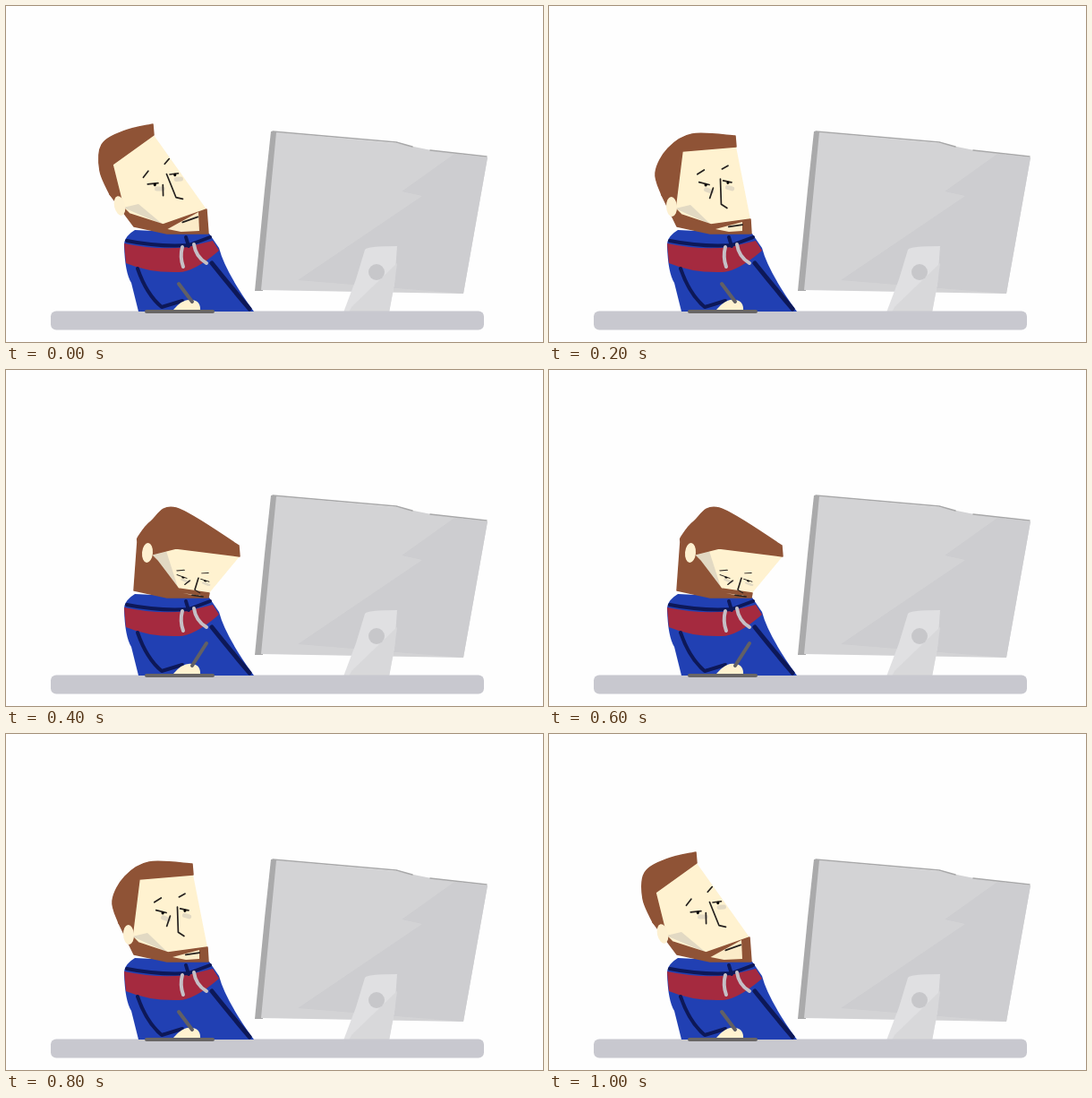
Animation, 600 px wide and 375 px high, one loop 1.1 s. Source, as an HTML page:

```html
<!DOCTYPE html>
<html lang="en">
<head>
<meta charset="utf-8">
<title>Tired at the desk</title>
<style>
  html, body { margin: 0; width: 100%; height: 100%; overflow: hidden; background: #fefefe; }
  svg { display: block; width: 100%; height: 100%; }
  .line { fill: none; stroke-linecap: round; stroke-linejoin: round; }
  .ink { stroke: #25211f; stroke-width: 1.7; }
  .shade { stroke: #e2d9c3; stroke-width: 5; }
  .hair { fill: #8f5336; stroke: #8f5336; stroke-width: 1.5; stroke-linejoin: round; }
</style>
</head>
<body>
<svg viewBox="0 0 600 375">
  <g id="monitor">
    <path fill="#aaaaab" d="M296 140H303L287 318H278L289 205Z"/>
    <path fill="#d3d3d5" d="M302 141L436 153 480 162 538 169 511 321 285 317Z"/>
    <path fill="#cdcdd0" d="M501 165L538 169 511 321 326 306 465 212 442 207Z"/>
    <path class="line" stroke="#a8a8a9" stroke-width="1.5" d="M298 140L436 152 454 157M474 161L537 168"/>
    <path fill="#e0e0e2" d="M401 272Q403 268 437 268L434 310 428 342H377L391 305Z"/>
    <path fill="#d8d8da" d="M437 287L386 336 383 342H428L434 310Z"/>
    <circle cx="414" cy="297" r="9" fill="#c7c7ca"/>
  </g>
  <rect x="50" y="340.5" width="484" height="21" rx="6" fill="#c8c8cf"/>
  <g id="body">
    <path fill="#2140b3" d="M144 250Q131 258 132 268 133 298 140 309L148 341H277Q245 297 238 270L227 254Z"/>
    <path fill="#a52a3f" d="M132 265Q170 273 202 269L231 262 238 273Q210 297 193 297 160 298 134 287Z"/>
    <g class="line" stroke="#0d1858">
      <path stroke-width="4" d="M135 262Q170 269 204 267L228 258M201 258L204 268M147 293Q157 322 174 336L197 329"/>
      <path stroke-width="5" d="M230 287Q250 312 272 338"/>
    </g>
    <path class="line" stroke="#c5c0c6" stroke-width="4" d="M197 269Q194 280 198 291M210 266Q212 280 224 287"/>
  </g>
  <path id="face" fill="#fff2d0"/>
  <path id="cheek" fill="#e2d9c3"/>
  <path id="hair" class="hair"/>
  <path id="beard" class="hair"/>
  <ellipse id="ear" rx="6" ry="11" fill="#fdf0d0"/>
  <path id="mouth" fill="#fbebc8"/>
  <path id="lips" class="line ink"/>
  <g id="features">
    <path class="line shade" d="M1 6L7 9M25 6L30 8"/>
    <path class="line ink" d="M-7 -12L1 -16M21 -15L28 -18M-6 -3L5 1M21 -2L30 1M18 -4L16 24 22 29M9 5L4 16"/>
    <circle cx="1" cy="1" r="1.6"/><circle cx="26" cy="1" r="1.6"/>
  </g>
  <path fill="#fff2d0" d="M187 339Q198 326 208 328 218 329 217 341Z"/>
  <path class="line" stroke="#696665" stroke-width="4" d="M157 341H231"/>
  <path id="pen" class="line" stroke="#626064" stroke-width="4"/>
</svg>
<script>
const parts = Object.fromEntries(
  [...document.querySelectorAll('[id]')].map(node => [node.id, node]));

// Key points of the head; look is the left eye, the eye line's angle and the foreshortening
const leaning = {
  tip: [164, 132], top: [131, 140], crown: [107, 155], back: [105, 184], hairline: [119, 177],
  ear: [127, 223], chin: [224, 227], look: [165, 199, -26, 1], pen: [193, 310]
};
const upright = {
  tip: [208, 145], top: [160, 143], crown: [133, 159], back: [119, 186], hairline: [149, 162],
  ear: [137, 224], chin: [225, 238], look: [174, 199, -6, 1], pen: [193, 310]
};
const nodding = {
  tip: [228, 158], top: [181, 148], crown: [147, 162], back: [132, 188], hairline: [166, 165],
  ear: [145, 219], chin: [226, 244], look: [186, 204, 2, 1], pen: [193, 310]
};
const drooped = {
  tip: [260, 196], top: [190, 154], crown: [162, 169], back: [148, 186], hairline: [190, 199],
  ear: [158, 204], chin: [227, 249], look: [197, 231, 9, 0.5], pen: [224, 305]
};

const blend = (a, b, amount) => a.map((value, i) => value + (b[i] - value) * amount);
const mixPose = (from, to, amount) => Object.fromEntries(
  Object.keys(from).map(key => [key, blend(from[key], to[key], amount)]));

const poses = [
  leaning, mixPose(leaning, upright, 0.5), upright, nodding,
  drooped, mixPose(nodding, drooped, 1.04)
];

const shift = ([x, y], dx, dy) => [x + dx, y + dy];
const polygon = (...points) => `M${points.join('L')}Z`;

// Catmull-Rom curve through the points
function curve(points) {
  const at = i => points[Math.max(0, Math.min(points.length - 1, i))];
  const handle = (i, sign) => at(i).map((v, k) => v + sign * (at(i + 1)[k] - at(i - 1)[k]) / 6);
  return 'M' + points[0] + points.slice(1).map((point, i) =>
    `C${handle(i, 1)} ${handle(i + 1, -1)} ${point}`).join('');
}

const STEP = 100, LOOP = 1100;
const JAW = [143, 246], BASE = [226, 254];
const start = performance.now();

function drawHead({ tip, top, crown, back, hairline, ear, chin, look, pen }) {
  const front = shift(tip, 1, 12);
  const nape = shift(ear, -11, -13);
  const burn = shift(ear, 4, 2);
  const lip = [(ear[0] + chin[0]) / 2, 244];
  const shape = (id, d) => parts[id].setAttribute('d', d);

  shape('face', polygon(shift(tip, 0, 6), front, chin, BASE, JAW, burn, hairline));
  shape('cheek', polygon(burn, shift(ear, 21, -2), lip));
  shape('hair', `${curve([tip, top, crown, back, nape])}L${[burn, hairline, front].join('L')}Z`);
  shape('beard', polygon(nape, burn, shift(ear, 11, 9), lip, chin, BASE, [180, 254], JAW));
  shape('mouth', polygon(shift(lip, 5, 5), shift(chin, -9, 3), [216, 251], shift(lip, 20, 8)));
  shape('lips', `M${shift(blend(lip, chin, 0.45), 0, 5)}L${shift(blend(lip, chin, 0.8), 0, 5)}`);
  shape('pen', `M${pen}L208 330`);

  const [x, y, angle, depth] = look;
  parts.ear.setAttribute('transform', `translate(${ear}) rotate(${angle / 2})`);
  parts.features.setAttribute('transform',
    `translate(${x} ${y}) rotate(${angle}) scale(1 ${depth})`);
}

function draw(time) {
  const step = Math.floor((time % LOOP) / STEP);
  drawHead(poses[5 - Math.abs(5 - step)]);
}

function tick(now) {
  draw(Math.max(0, now - start));
  requestAnimationFrame(tick);
}

draw(0);
requestAnimationFrame(tick);
</script>
</body>
</html>
```
